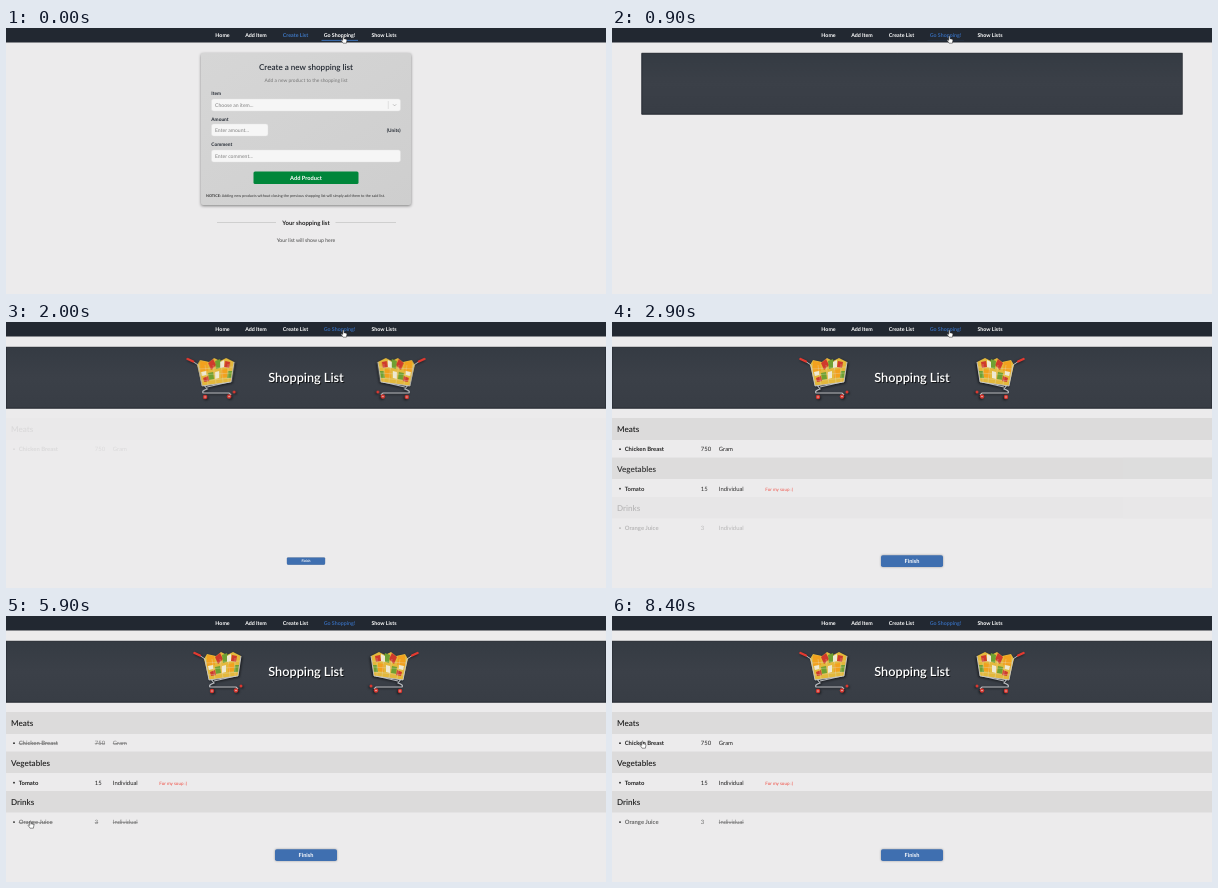
Animation of 600x266 px, one loop 8.6 s. Source, as an HTML page:

```html
<!DOCTYPE html>
<html lang="en">
<head>
<meta charset="utf-8">
<title>Shopping list</title>
<style>
html, body { margin: 0; width: 100%; height: 100%; overflow: hidden; background: #ecebec; }
svg { display: block; width: 100vw; height: 100vh; font-family: Lato, "Open Sans", sans-serif; text-rendering: geometricPrecision; }
.mid { text-anchor: middle; }
.b { font-weight: 700; }
.nav { font-size: 5.3px; font-weight: 700; fill: #fff; text-anchor: middle; }
.label { font-size: 4.8px; font-weight: 700; fill: #222831; }
.hint { font-size: 5.1px; fill: #808080; }
.field { fill: #f6f6f6; stroke: #dedede; stroke-width: .4; }
.head { font-size: 8.1px; font-weight: 600; fill: #222; }
.bar { fill: #dcdbdb; }
.row { font-size: 5.9px; fill: #222; }
.done { fill: #777; text-decoration: line-through; }
.note { font-size: 4.5px; fill: #f0483e; }

.anim, .anim-all > * { animation: 8.6s linear infinite; }
.form { animation-name: form; }
.from { animation-name: from; }
.to { animation-name: to; }
.line { animation-name: underline; }
.panel { animation-name: panel; transform-origin: 300px 0; }
.slide { animation-name: slide; }
.title { animation-name: title; }
.meats { animation-name: meats; }
.veg { animation-name: veg; }
.drinks { animation-name: drinks; }
.finish { animation-name: finish; }
.chicken > text { animation-name: chicken; animation-timing-function: step-end; }
.juice > text { animation-name: juice; animation-timing-function: step-end; }
.juice > .unit { animation-name: unit; }
.cursor { animation-name: cursor; }
.hand { animation-name: hand; animation-timing-function: step-end; }
.arrow { animation-name: arrow; animation-timing-function: step-end; }

@keyframes form { 0%, 1.163% { opacity: 1 } 5.7%, 100% { opacity: 0 } }
@keyframes from { 0%, 1.163% { fill: #3f78c4 } 4.65%, 100% { fill: #fff } }
@keyframes to { 0%, 1.163% { fill: #fff } 4.65%, 100% { fill: #3568b0 } }
@keyframes underline { 0%, 1.163% { opacity: 1 } 11.6%, 100% { opacity: 0 } }
@keyframes panel {
  0%, 5.756% { transform: scaleX(0); animation-timing-function: ease-in-out }
  11.802%, 100% { transform: scaleX(1) }
}
@keyframes slide {
  0%, 11.628% { transform: translateX(-313px); animation-timing-function: cubic-bezier(.33, 1, .68, 1) }
  27.674%, 100% { transform: none }
}
@keyframes title {
  0%, 11.628% { transform: scale(0); opacity: 0; animation-timing-function: cubic-bezier(.33, 1, .68, 1) }
  22.093%, 100% { transform: scale(1); opacity: 1 }
}
@keyframes meats { 0%, 22.674% { opacity: 0 } 29.651%, 100% { opacity: 1 } }
@keyframes veg { 0%, 27.326% { opacity: 0 } 34.302%, 100% { opacity: 1 } }
@keyframes drinks { 0%, 31.977% { opacity: 0 } 38.953%, 100% { opacity: 1 } }
@keyframes finish {
  0%, 21.512% { transform: scale(0); animation-timing-function: cubic-bezier(.33, 1, .68, 1) }
  27.907%, 100% { transform: scale(1) }
}
@keyframes chicken {
  0% { fill: #222; text-decoration: none }
  54.651% { fill: #777; text-decoration: line-through }
  86.047%, 100% { fill: #222; text-decoration: none }
}
@keyframes juice {
  0% { fill: #222; text-decoration: none }
  68.605% { fill: #777; text-decoration: line-through }
  76.744%, 100% { fill: #666; text-decoration: none }
}
@keyframes unit {
  0% { fill: #222; text-decoration: none }
  68.605%, 100% { fill: #777; text-decoration: line-through }
}
@keyframes cursor {
  0%, 34.884% { transform: translate(338px, 12px); animation-timing-function: ease-in-out }
  50%, 56.977% { transform: translate(31px, 129px); animation-timing-function: ease-in }
  60.465% { transform: translate(38px, 168px); animation-timing-function: ease-out }
  63.953%, 74.419% { transform: translate(25px, 209px); animation-timing-function: ease-in }
  78.488% { transform: translate(33px, 169px); animation-timing-function: ease-out }
  82.558%, 100% { transform: translate(31px, 129px) }
}
@keyframes hand { 0% { opacity: 1 } 37% { opacity: 0 } 48.8%, 100% { opacity: 1 } }
@keyframes arrow { 0% { opacity: 0 } 37% { opacity: 1 } 48.8%, 100% { opacity: 0 } }
</style>
</head>
<body>
<svg viewBox="0 0 600 266" preserveAspectRatio="none">
  <defs>
    <linearGradient id="slate" x2="0" y2="1">
      <stop stop-color="#353b43"/><stop offset=".5" stop-color="#3b4048"/><stop offset="1" stop-color="#383d45"/>
    </linearGradient>
    <linearGradient id="card" x2="1" y2="1">
      <stop stop-color="#d6d6d6"/><stop offset="1" stop-color="#cecece"/>
    </linearGradient>
    <g id="cart" style="filter:drop-shadow(1px 1.5px 1px #0009)">
      <path d="M-13-13L-7 7L-4 11Q-10 13-8 15H18L20 17M18 4L-4 9" fill="none" stroke="#b9bcc0" stroke-width="1.2"/>
      <path d="M-14-13L-11-18L-2-16L3-20L9-17L15-20L23-16L20 4L-9 8Z" fill="#e3b83c"/>
      <path d="M-11-17l7 1l1 9l-8 1zM10-8l6-1v8l-6 1z" fill="#f2a11e"/>
      <path d="M-3-15l5-4l3 6l-5 5zM14-17l5 1l-1 6l-5-1zM-8 0l5-2l1 5l-5 1z" fill="#cf3a2c"/>
      <path d="M4-17l5-2l2 8l-6 2zM-3-5l5-1l1 7l-5 1zM17-7h4l-1 7h-4z" fill="#6fa032"/>
      <path d="M9-16l4-2v7l-4 1zM4-6l4-1v7l-4 1zM-10-6l5-1v4l-4 1z" fill="#efe9d2"/>
      <path d="M-13-9L22-11M-11-3L21-5M-10 3L20 0M-6-13L-3 7M2-13L5 6M10-14L12 5M17-14L17 4" fill="none" stroke="#e4dfd0" stroke-width=".4" opacity=".75"/>
      <path d="M-19-17L-13-13L-9 8L20 4L23-16" fill="none" stroke="#c9cbce" stroke-width=".9"/>
      <path d="M-23.5-19L-18-16.5" stroke="#e23a30" stroke-width="2.4" stroke-linecap="round"/>
      <g fill="#d93830"><circle cx="-6" cy="19" r="2.2"/><circle cx="18" cy="18.5" r="2.2"/><circle cx="23" cy="14" r="1.5"/></g>
      <g fill="#ddd"><circle cx="-6" cy="19" r=".7"/><circle cx="18" cy="18.5" r=".7"/></g>
    </g>
  </defs>

  <rect width="600" height="266" fill="#ecebec"/>

  <g class="anim form">
    <rect x="195" y="25" width="210" height="152" rx="2" fill="url(#card)" style="filter:drop-shadow(0 1px 1.5px #0007)"/>
    <text class="mid" x="300" y="42" font-size="8.1" font-weight="600" fill="#222831">Create a new shopping list</text>
    <text class="mid" x="300" y="54" font-size="4.9" fill="#777">Add a new product to the shopping list</text>
    <text class="label" x="205.3" y="67">Item</text>
    <rect class="field" x="205.5" y="71" width="189" height="12" rx="2"/>
    <text class="hint" x="209" y="79">Choose an item...</text>
    <path d="M382.3 73v8" stroke="#ccc" stroke-width=".5"/>
    <path d="M387 76.3l1.6 1.6l1.6-1.6" fill="none" stroke="#aaa" stroke-width=".7"/>
    <text class="label" x="205.3" y="92.5">Amount</text>
    <rect class="field" x="205.5" y="96" width="56.5" height="12" rx="2"/>
    <text class="hint" x="209" y="104">Enter amount...</text>
    <text class="label" x="394.5" y="104" text-anchor="end">(Units)</text>
    <text class="label" x="205.3" y="118">Comment</text>
    <rect class="field" x="205.5" y="122" width="189" height="12" rx="2"/>
    <text class="hint" x="209" y="130">Enter comment...</text>
    <rect x="247.5" y="143.5" width="105" height="12.5" rx="1.5" fill="#00863a"/>
    <text class="mid b" x="300" y="152" font-size="5.7" fill="#fff">Add Product</text>
    <text x="200" y="169" font-size="3.75" fill="#333"><tspan class="b">NOTICE:</tspan> Adding new products without closing the previous shopping list will simply add them to the said list.</text>
    <path d="M211 194.5h59M329.5 194.5h60.5" stroke="#bdbdbd" stroke-width=".6"/>
    <text class="mid b" x="300" y="196.6" font-size="6" fill="#222">Your shopping list</text>
    <text class="mid" x="300" y="214" font-size="5.15" fill="#444">Your list will show up here</text>
  </g>

  <rect class="anim panel" x="0" y="25.3" width="600" height="60.9" fill="url(#slate)" stroke="#22272e" vector-effect="non-scaling-stroke"/>
  <g transform="translate(212 56)"><g class="anim slide"><use href="#cart"/></g></g>
  <g transform="translate(388 56) scale(-1 1)"><g class="anim slide"><use href="#cart"/></g></g>
  <g transform="translate(300 56)">
    <g class="anim title">
      <text class="mid" y="4.4" font-size="12.7" font-weight="600" fill="#fff" style="filter:drop-shadow(1px 1px .7px #000a)">Shopping List</text>
    </g>
  </g>

  <g class="anim meats">
    <rect class="bar" y="96" width="600" height="22"/>
    <text class="head" x="5" y="110">Meats</text>
    <circle cx="8" cy="127.2" r=".9" fill="#222"/>
    <g class="row anim-all chicken">
      <text class="b" x="12.7" y="129">Chicken Breast</text>
      <text x="88.8" y="129">750</text>
      <text x="106.8" y="129">Gram</text>
    </g>
  </g>
  <g class="anim veg">
    <rect class="bar" y="135.5" width="600" height="21.5"/>
    <text class="head" x="5" y="149.5">Vegetables</text>
    <circle cx="8" cy="166.7" r=".9" fill="#222"/>
    <g class="row">
      <text class="b" x="12.7" y="168.5">Tomato</text>
      <text x="88.8" y="168.5">15</text>
      <text x="106.8" y="168.5">Individual</text>
    </g>
    <text class="note" x="153.3" y="168.5">For my soup :)</text>
  </g>
  <g class="anim drinks">
    <rect class="bar" y="175" width="600" height="21.5"/>
    <text class="head" x="5" y="188.6">Drinks</text>
    <circle cx="8" cy="206.1" r=".9" fill="#222"/>
    <g class="row anim-all juice">
      <text class="b" x="12.7" y="208">Orange Juice</text>
      <text x="88.8" y="208">3</text>
      <text class="unit" x="106.8" y="208">Individual</text>
    </g>
  </g>

  <g transform="translate(300 239)">
    <g class="anim finish">
      <rect x="-31" y="-5.8" width="62" height="11.8" rx="1.8" fill="#3f6fb0" style="filter:drop-shadow(0 .6px .8px #0005)"/>
      <text class="mid b" y="2.1" font-size="5.6" fill="#fff">Finish</text>
    </g>
  </g>

  <rect width="600" height="14.5" fill="#222831"/>
  <text class="nav" x="216.5" y="9">Home</text>
  <text class="nav" x="250" y="9">Add Item</text>
  <text class="nav anim from" x="289.5" y="9">Create List</text>
  <text class="nav anim to" x="333.5" y="9">Go Shopping!</text>
  <text class="nav" x="378" y="9">Show Lists</text>
  <path class="anim line" d="M315.5 12.4h36.5" stroke="#3f78c4" stroke-width=".9"/>

  <g class="anim cursor" fill="#fff" stroke="#222" stroke-width=".5" stroke-linejoin="round">
    <path class="anim hand" d="M-1.2-3.6q.7-.7 1.2 0V-1.3l2.2.5q.8.3.7 1.1L2.4 3.2H-.9L-2.8.5q0-.9.8-.7l.8.6z"/>
    <path class="anim arrow" d="M-1.5-3.5v6l1.4-1.2l1 2.1l.9-.4l-.9-2h1.8z"/>
  </g>
</svg>
</body>
</html>
```
